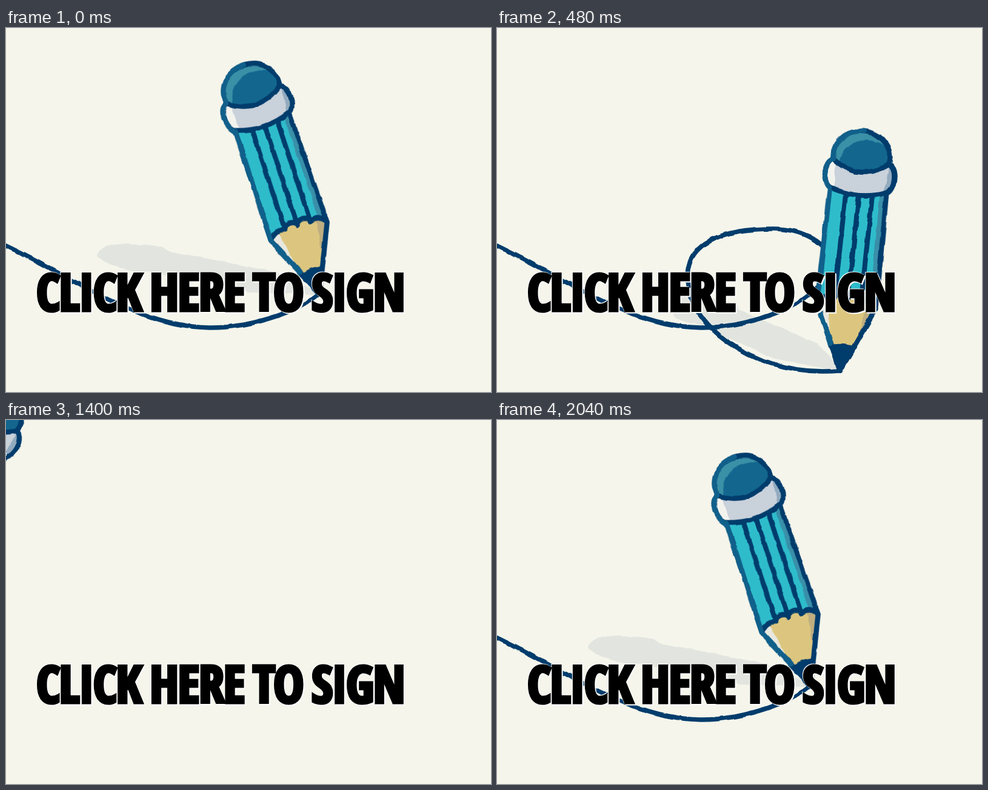
An HTML page that plays this animation: 800 px wide and 600 px high, repeating every 2.08 s.

```html
<!DOCTYPE html>
<html lang="en">
<head>
<meta charset="utf-8">
<title>Click here to sign</title>
<style>
html, body { margin: 0; width: 100%; height: 100%; overflow: hidden; background: #f5f5eb; }
svg { display: block; width: 800px; height: 600px; }
#label {
  font-weight: 900;
  font-stretch: 62.5%;
  letter-spacing: -.02em;
  word-spacing: -.06em;
  stroke: #000;
  stroke-width: 5;
  filter: drop-shadow(2px 2px 0 #fff) drop-shadow(-1px -1px 0 #fff);
}
</style>
</head>
<body>
<svg viewBox="0 0 800 600">
  <defs>
    <filter id="rough" filterUnits="userSpaceOnUse" x="0" y="0" width="800" height="600" color-interpolation-filters="sRGB">
      <feTurbulence type="fractalNoise" baseFrequency=".06" seed="4"/>
      <feColorMatrix values="1 0 0 0 0  0 1 0 0 0  0 0 1 0 0  0 0 0 0 1" result="noise"/>
      <feDisplacementMap in="SourceGraphic" in2="noise" scale="5" xChannelSelector="R" yChannelSelector="G"/>
    </filter>
    <path id="outline" d="M0 0L-49-108L-47-298C-60-304-62-340-46-346A47 42 0 1 1 46-346C62-340 60-304 47-298L49-108Z"/>
    <path id="band" d="M-46-346C-62-340-60-304-46-299Q0-282 46-299C60-304 62-340 46-346Q0-312-46-346Z"/>
    <path id="dome" d="M-46-346A47 42 0 1 1 46-346Q0-312-46-346Z"/>
    <path id="wood" d="M0 0L-49-108Q-38-124-21-118A11 8 0 0 1 1-119A11 8 0 0 1 23-118Q40-124 49-108Z"/>
    <clipPath id="inBody"><use href="#outline"/></clipPath>
    <clipPath id="inBand"><use href="#band"/></clipPath>
    <clipPath id="inDome"><use href="#dome"/></clipPath>
    <clipPath id="inWood"><use href="#wood"/></clipPath>
  </defs>
  <g filter="url(#rough)" stroke-linecap="round" stroke-linejoin="round">
    <g id="shadow" fill="#e2e5df" stroke="#e2e5df" stroke-width="8"><use href="#outline"/></g>
    <path id="line" fill="none" stroke="#003c6c" stroke-width="7.5"/>
    <g id="pencil" fill="none" stroke-width="8">
      <g clip-path="url(#inBody)">
        <path fill="#2ebccb" d="M-60-310H60V-100H-60Z"/>
        <path fill="#3a8fa8" d="M36-310H60V-100H38Z"/>
        <path stroke="#003c6c" d="M-20-295L-21-120M2-295L1-120M24-295L23-120"/>
      </g>
      <g clip-path="url(#inWood)">
        <use href="#wood" fill="#e8e8e0"/>
        <path fill="#dcc67f" d="M-36-140H60V0H0L-20-40Z"/>
        <path fill="#bfae80" d="M36-140H60L20-20L23-50Z"/>
        <path fill="#003c6c" d="M-30-37Q0-50 30-39V0H-30Z"/>
      </g>
      <use href="#wood" stroke="#003c6c"/>
      <g clip-path="url(#inBand)">
        <use href="#band" fill="#f3f3ee"/>
        <path fill="#c9d1da" d="M-38-350Q-46-320-34-280H70V-350Z"/>
        <path fill="#93abbf" d="M46-350Q50-320 36-280H70V-350Z"/>
      </g>
      <use href="#band" stroke="#003c6c"/>
      <g clip-path="url(#inDome)">
        <use href="#dome" fill="#3a90a6"/>
        <use href="#dome" fill="#13678f" x="11" y="14"/>
      </g>
      <use href="#dome" stroke="#003c6c"/>
      <use href="#outline" stroke="#003c6c"/>
      <path stroke="#10608b" d="M-20-44L-49-108L-47-298C-60-304-62-340-46-346A47 42 0 0 1 0-396.6"/>
    </g>
  </g>
  <text id="label" x="50" y="466">CLICK HERE TO SIGN</text>
</svg>
<script>
const $ = id => document.getElementById(id);
const LOOP = 2080, STEP = 40, ENTER = 1400, LEAVE = 3240;
const line = $("line"), label = $("label");

// The stroke as a chain of curves; a place such as 2.75 is 3/4 along the third one.
const legs = [
  "M-170 312C-110 320-60 329 0 359",
  "C120 416 220 494 340 494",
  "C420 494 548 450 548 385",
  "C548 355 505 331 455 331",
  "C380 331 314 350 314 410",
  "C314 490 420 566 537 566",
  "C630 566 720 525 797 478",
  "S1000 365 1073 322",
  "L1250 218"
];
const ends = [0];
let d = "";
for (const leg of legs) {
  line.setAttribute("d", d += leg);
  ends.push(line.getTotalLength());
}
const lengthAt = place => {
  const i = Math.min(Math.floor(place), legs.length - 1);
  return ends[i] + (ends[i + 1] - ends[i]) * (place - i);
};

// Time runs from the pencil's entry until everything has left the stage.
const poses = [ // time, place of the tip, lean in degrees
  [ENTER, 0, 25], [1800, 1.7, 12.7], [2040, 2.75, -18.5], [LOOP, 2.75, -18.5],
  [2360, 5.26, 24], [2760, 7, -12.5], [3080, 8, -14], [LEAVE, 9, -14]
];
const tail = [[2480, 0], [2760, 1.9], [3080, 5.7], [LEAVE, 7.2]]; // time, place
const tipKeys = poses.map(([t, place]) => [t, lengthAt(place)]);
const leanKeys = poses.map(([t, , lean]) => [t, lean]);
const tailKeys = tail.map(([t, place]) => [t, lengthAt(place)]);

function valueAt(keys, t) {
  const i = keys.findIndex(key => key[0] > t);
  if (i < 1) return keys[i ? keys.length - 1 : 0][1];
  const [t0, v0] = keys[i - 1], [t1, v1] = keys[i];
  return v0 + (v1 - v0) * (t - t0) / (t1 - t0);
}

// Take the narrowest installed face, sized to the width of the caption
function setLabel() {
  const width = face => {
    label.style.fontFamily = `"${face}", sans-serif`;
    label.style.fontSize = "100px";
    return label.getComputedTextLength();
  };
  const faces = ["Noto Sans", "Open Sans", "Open Sans Condensed", "Roboto", "Roboto Condensed", "Liberation Sans"];
  const best = faces.reduce((a, b) => width(b) < width(a) ? b : a);
  label.style.fontSize = Math.min(90, 60700 / width(best)) + "px";
}

function draw(now) {
  const t = Math.floor(now % LOOP / STEP) * STEP;
  const u = t < ENTER ? t + LOOP : t;
  const tip = valueAt(tipKeys, u), start = valueAt(tailKeys, u), lean = valueAt(leanKeys, u);
  const { x, y } = line.getPointAtLength(tip);
  line.setAttribute("stroke-dasharray", `0 ${start} ${tip - start} 9999`);
  $("pencil").setAttribute("transform", `translate(${x} ${y}) rotate(${lean})`);
  $("shadow").setAttribute("transform", `translate(${x} ${y}) matrix(.612 -.258 .75 .2765 0 0) rotate(${lean})`);
  for (const el of [line, $("pencil"), $("shadow")]) {
    el.setAttribute("visibility", u < LEAVE ? "visible" : "hidden");
  }
}

setLabel();
const begun = performance.now();
function loop() {
  draw(performance.now() - begun);
  requestAnimationFrame(loop);
}
loop();
</script>
</body>
</html>
```
